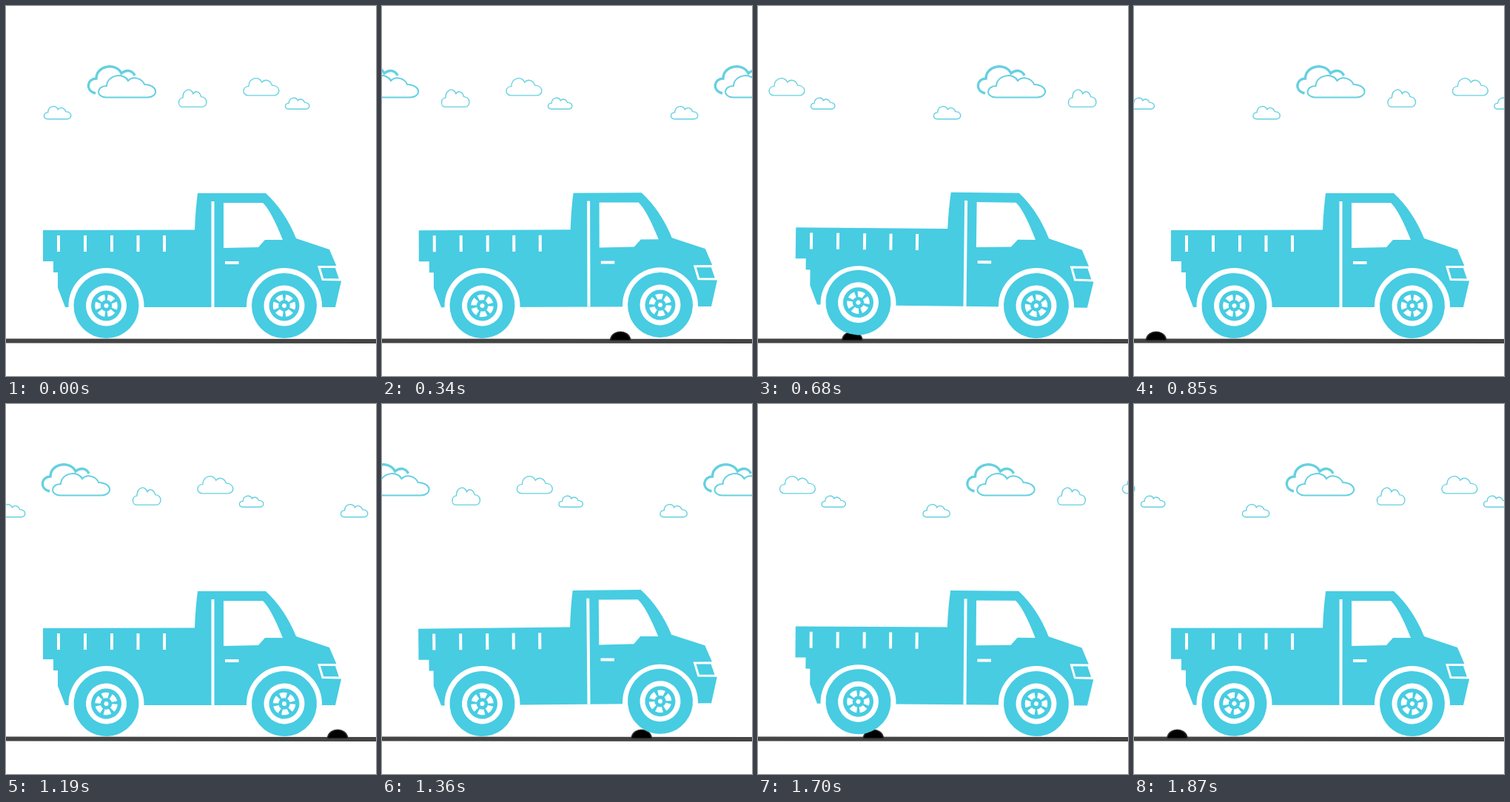
Animation, 500 px wide and 500 px high, one loop 2040 ms. Source, as an HTML page:

```html
<!DOCTYPE html>
<html lang="en">
<head>
<meta charset="utf-8">
<title>Truck on a bumpy road</title>
<style>
  html, body { margin: 0; width: 100%; height: 100%; overflow: hidden; background: #fff; }
  svg { display: block; width: 100vw; height: 100vh; }
  .paint { fill: #47cce2; }
  .cut { fill: #fff; }
  #clouds { fill: none; stroke: #66d0e0; stroke-width: 1.4; stroke-linecap: round; }
  #cloud { vector-effect: non-scaling-stroke; }
</style>
</head>
<body>
<svg viewBox="0 0 500 500">
  <defs>
    <path id="cloud" d="M10 29C-4 28.5-3 13.5 11 13.5C12-2.5 35-4.5 40 6.5C47-.5 59 3.5 62 11.5C82 12.5 81 28.5 66 29Z"/>
    <g id="clouds">
      <path stroke-width="3.4" stroke-linecap="butt" d="M121 118C106 114 110 98 122 98C122 80 149 76 156 91C163 85 171 87 174 94"/>
      <use href="#cloud" transform="translate(125 94.5)" fill="#fff" stroke-width="2"/>
      <use href="#cloud" transform="translate(233.5 113.5) scale(.485 .79)"/>
      <use href="#cloud" transform="translate(321 98) scale(.62 .79)"/>
      <use href="#cloud" transform="translate(377.5 124.5) scale(.42 .51)"/>
      <use href="#cloud" transform="translate(51.5 136) scale(.47 .58)"/>
    </g>
    <g id="wheel">
      <circle class="paint" r="44"/>
      <circle class="cut" r="27.5"/>
      <circle class="paint" r="20.5"/>
      <circle r="11.5" fill="none" stroke="#fff" stroke-width="7.5" pathLength="60" stroke-dasharray="7 3" stroke-dashoffset="3.5"/>
      <circle class="cut" r="3"/>
    </g>
  </defs>

  <use id="near" href="#clouds"/>
  <use id="next" href="#clouds"/>

  <g id="body">
    <path class="paint" d="M50 303L255 302.5Q256 275 259 253H351Q377 277 392 314L437 329L446 350L453 372L445 407H80L70 381V360H64V345H50Z"/>
    <path class="cut" d="M294 266H347Q358 276 374 316H350L341 326L294 327Z"/>
    <path class="cut" d="M277.5 264H281.5V407H277.5ZM296 345H314.500V349H296Z"/>
    <path d="M71 310V332M107 310V332M143 310V332M178.500 310V332M214 310V332" stroke="#fff" stroke-width="4"/>
    <path class="paint" d="M423 352.500H446L452 370L428 369.500Z" stroke="#fff" stroke-width="3"/>
    <circle class="cut" cx="135.500" cy="405" r="51"/>
    <circle class="cut" cx="376" cy="405" r="51"/>
  </g>

  <path d="M0 449.500L500 450V456L0 455.500Z" fill="#444"/>
  <path id="bump" d="M-13.500 452V450C-10 437 10 437 13.500 450V452Z" stroke="#333" stroke-width="1.500"/>
  <use id="rear" href="#wheel"/>
  <use id="front" href="#wheel"/>
</svg>
<script>
  const LOOP = 2040, STEP = 170, REAR = 135.5, FRONT = 376, AXLE = 405;
  const move = (id, value) => document.getElementById(id).setAttribute('transform', value);

  // A wheel rises quickly onto the bump and settles more slowly.
  const lift = dx => 4.5 * Math.exp(-((dx / (dx > 0 ? 30 : 45)) ** 2));

  function draw(t) {
    const second = t >= LOOP / 2;
    const bump = (second ? 1130 : 517) - 0.573 * t;
    const sky = (second ? 473.5 : 0) - 0.45 * t;
    const gap = second ? 463 : 492;
    move('near', `translate(${sky})`);
    move('next', `translate(${sky + gap})`);
    move('bump', `translate(${bump})`);

    const rear = lift(bump - REAR), front = lift(bump - FRONT);
    const spin = t / STEP * 12;
    move('rear', `translate(${REAR} ${AXLE - rear}) rotate(${spin})`);
    move('front', `translate(${FRONT} ${AXLE - front}) rotate(${spin})`);

    const tilt = Math.atan(0.65 * (rear - front) / (FRONT - REAR)) * 180 / Math.PI;
    move('body', `translate(0 ${-0.65 * front}) rotate(${tilt} ${FRONT} ${AXLE})`);
  }

  let start;
  function tick(now) {
    start ??= now;
    draw(Math.floor((now - start) % LOOP / STEP) * STEP);
    requestAnimationFrame(tick);
  }
  draw(0);
  requestAnimationFrame(tick);
</script>
</body>
</html>
```
